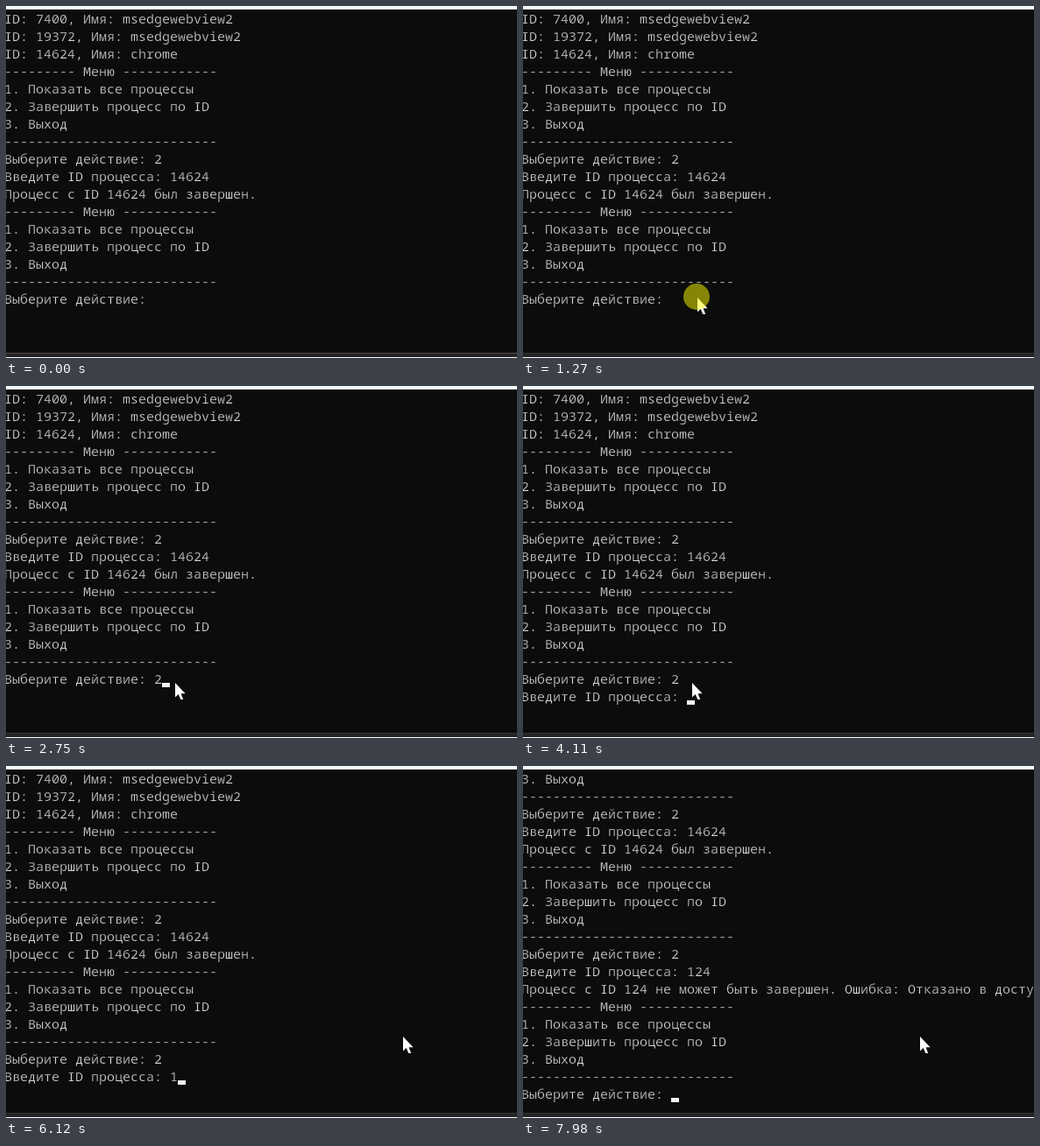
Recreate the animation shown at these times as an HTML page. Size 583 px wide and 402 px high, loop 8 s.

```html
<!DOCTYPE html>
<html lang="ru">
<head>
<meta charset="utf-8">
<title>Console</title>
<style>
  html, body { margin: 0; width: 100%; height: 100%; overflow: hidden; background: #0c0c0c; }
  #stage { position: relative; width: 583px; height: 402px; overflow: hidden; background: #0c0c0c; }
  #stage > * { position: absolute; }
  #top { left: 0; top: 0; width: 583px; height: 4px; background: #f4fdf9; }
  #bar {
    left: 0; top: 396px; width: 583px; height: 4px; background: #232323;
    border: solid #333; border-width: 1px 0; border-bottom-color: #fff;
  }
  #bar.idle { border-top-color: #504c4e; background: #262324; }
  #text {
    left: -2px; top: 4px; margin: 0; color: #d6d6d6;
    font: 300 15px/20px "Noto Sans Mono", "Liberation Mono", monospace;
    font-variant-ligatures: none;
    -webkit-text-stroke: .25px #0c0c0c; /* thins the strokes */
  }
  #caret { left: 0; top: 0; width: 9px; height: 5px; background: #f2f2f2; }
  #mouse { left: 0; top: 0; overflow: visible; }
</style>
</head>
<body>
<div id="stage">
  <div id="top"></div>
  <pre id="text"></pre>
  <div id="caret"></div>
  <div id="bar"></div>
  <svg id="mouse" width="14" height="21">
    <path d="M0 0V16.5L3.7 13L6.3 19H9.2L6.6 12.2H11.6Z" fill="#fff"/>
    <circle id="click" cx="-1" cy="-1" r="15" fill="#ff0" fill-opacity=".5"/>
  </svg>
</div>
<script>
const LOOP = 8000, COL = 9, ROW = 20;
const $ = id => document.getElementById(id);
const text = $('text'), caret = $('caret'), mouse = $('mouse'), click = $('click'), bar = $('bar');

const rule = '-'.repeat(27);
const menu = [
  '-'.repeat(9) + ' Меню ' + '-'.repeat(12),
  '1. Показать все процессы',
  '2. Завершить процесс по ID',
  '3. Выход',
  rule
];
const ask = 'Выберите действие: ', askId = 'Введите ID процесса: ';
const history = [
  'ID: 7400, Имя: msedgewebview2',
  'ID: 19372, Имя: msedgewebview2',
  'ID: 14624, Имя: chrome',
  ...menu,
  ask + '2',
  askId + '14624',
  'Процесс с ID 14624 был завершен.',
  ...menu
];
const failed = 'Процесс с ID 124 не может быть завершен. Ошибка: Отказано в доступе.';

// [time, console input and output]
const output = [
  [0, ask], [2750, '2'], [4110, '\n' + askId],
  [6120, '1'], [6390, '2'], [6790, '4'], [7920, '\n'],
  [7980, [failed, ...menu, ask].join('\n')]
];

// the caret toggles at each of these times, starting hidden
const blinks = [1670, 2200, 2750, 3250, 3780, 4840, 5370, 5920, 6120, 6390, 6460, 6990, 7520];

// [start, end, from, to, frame length]
const moves = [
  [460, 1200, [252, 402], [199, 329], 67],
  [1200, 1270, [199, 329], [199, 333], 70],
  [1270, 1870, [199, 333], [193, 339], 67],
  [5290, 5770, [193, 339], [453, 309], 80]
];

const ease = p => p * p * (3 - 2 * p);

function mouseAt(t) {
  const move = moves.filter(m => t >= m[0]).pop();
  if (!move) return null;
  const [start, end, from, to, frame] = move;
  const time = t >= end ? end : start + Math.floor((t - start) / frame) * frame;
  const p = ease((time - start) / (end - start));
  return from.map((v, i) => Math.round(v + (to[i] - v) * p));
}

let shown = '';

function draw(t) {
  const typed = output.filter(o => t >= o[0]).map(o => o[1]).join('');
  const all = history.concat(typed.split('\n'));
  const lines = all.slice(Math.max(0, all.length - 19));
  const value = lines.join('\n');
  if (value !== shown) text.textContent = shown = value;

  const row = lines.length - 1, col = lines[row].length;
  caret.style.transform = `translate(${col * COL - 2}px, ${row * ROW + 19}px)`;
  caret.style.visibility = blinks.filter(b => t >= b).length % 2 ? 'visible' : 'hidden';

  const pos = mouseAt(t);
  mouse.style.display = pos ? 'block' : 'none';
  if (pos) mouse.style.transform = `translate(${pos[0]}px, ${pos[1]}px)`;
  click.style.display = t >= 1130 && t < 1400 ? 'inline' : 'none';
  bar.className = t < 1130 ? 'idle' : '';
}

const began = performance.now();
function tick() {
  draw((performance.now() - began) % LOOP);
  requestAnimationFrame(tick);
}
tick();
</script>
</body>
</html>
```
